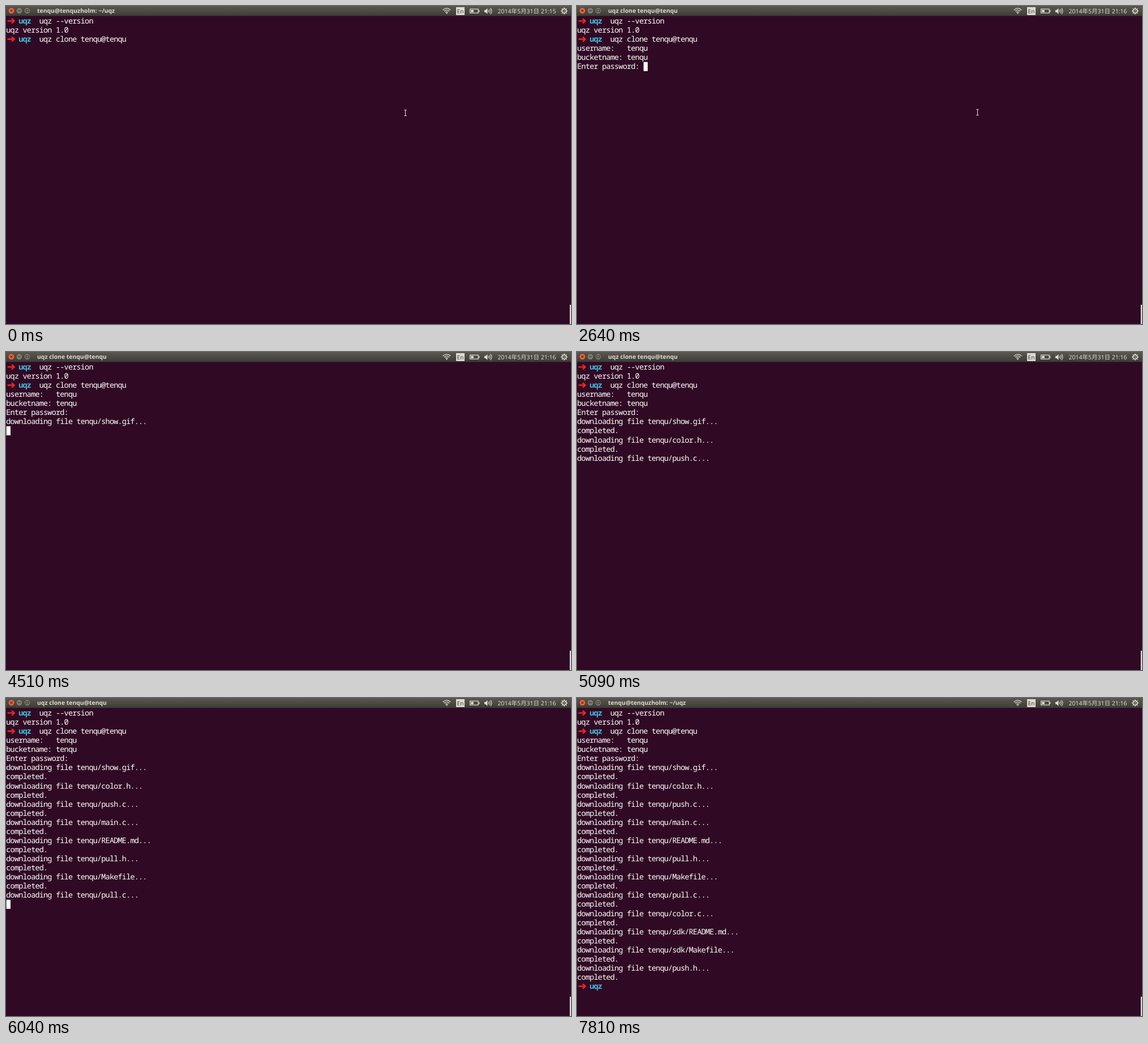
An HTML page with a canvas for the animation above (8000 ms loop, 998 by 561 pixels).

```html
<!DOCTYPE html>
<html lang="en">
<head>
<meta charset="utf-8">
<title>Terminal session</title>
<style>
  html, body { margin: 0; width: 100%; height: 100%; overflow: hidden; background: #300a24; }
  canvas { display: block; }
</style>
</head>
<body>
<canvas id="stage" width="998" height="561"></canvas>
<script>
const ctx = document.getElementById('stage').getContext('2d');
const LOOP = 8000;
const CELL = 7.305, ROW = 16.07, LEFT = 0.7, TOP = 18.4;
const MONO = '13.5px "Noto Sans Mono", "DejaVu Sans Mono", monospace';
const SANS = '"Noto Sans", "Noto Sans CJK SC", "Open Sans", sans-serif';
const PALE = '#dfdbd2';

const TOOL = 'uqz', USER = 'tenqu', HOST = 'tenquzholm';
const COMMAND = `${TOOL} clone ${USER}@${USER}`;

// Time at which each download line is printed.
const downloads = [
  [3830, 'show.gif'], [4740, 'color.h'], [4900, 'push.c'], [5400, 'main.c'],
  [5560, 'README.md'], [5720, 'pull.h'], [5870, 'Makefile'], [6040, 'pull.c'],
  [6360, 'color.c'], [6690, 'sdk/README.md'], [7260, 'sdk/Makefile'], [7610, 'push.h']
];
const DONE = 7750, PROMPT_BACK = 7810;
const blinkOn = [[3830, 3920], [4510, 5090], [5670, 6250], [6840, 7440]];

const within = (t, from, to) => t >= from && t < to;
const rowTop = row => TOP + row * ROW;

// Text sits on the terminal's cell grid, each glyph centred in its cell.
function print(text, row, col = 0, color = '#fff', weight = 500) {
  ctx.font = `${weight} ${MONO}`;
  ctx.letterSpacing = '0px';
  const spacing = CELL - ctx.measureText('m').width;
  ctx.letterSpacing = `${spacing}px`;
  ctx.fillStyle = color;
  ctx.fillText(text, LEFT + col * CELL + spacing / 2, rowTop(row) + 12.6);
  ctx.letterSpacing = '0px';
}

function label(text, x, y, font, color = PALE) {
  ctx.font = `${font} ${SANS}`;
  ctx.fillStyle = color;
  ctx.fillText(text, x, y);
}

function line(points, color, width) {
  ctx.strokeStyle = color;
  ctx.lineWidth = width;
  ctx.beginPath();
  points.forEach(([x, y]) => ctx.lineTo(x, y));
  ctx.stroke();
}

function arc(x, y, r, from, to, width = 1.2) {
  ctx.strokeStyle = PALE;
  ctx.lineWidth = width;
  ctx.beginPath();
  ctx.arc(x, y, r, from, to);
  ctx.stroke();
}

function disc(x, y, r, color) {
  ctx.fillStyle = color;
  ctx.beginPath();
  ctx.arc(x, y, r, 0, Math.PI * 2);
  ctx.fill();
}

function prompt(row, command = '') {
  const y = rowTop(row) + 8;
  ctx.lineCap = ctx.lineJoin = 'round';
  line([[3.6, y], [14, y]], '#ef2929', 2.4);
  line([[10.8, y - 3.5], [14.6, y], [10.8, y + 3.5]], '#ef2929', 2.4);
  ctx.lineCap = 'butt';
  ctx.lineJoin = 'miter';
  print(TOOL, row, 3, '#43bddb', 'bold');
  print(command, row, 8);
}

function block(row, col = 0) {
  ctx.fillStyle = '#fff';
  ctx.fillRect(LEFT + col * CELL, rowTop(row), CELL, ROW);
}

function pointer(x, y) {
  line([[x, y - 5], [x, y + 5]], '#e4dfe2', 1);
  for (const end of [-5, 5]) line([[x - 2.2, y + end], [x + 2.2, y + end]], '#e4dfe2', 1);
}

function windowButtons() {
  for (const [x, color] of [[9.5, '#e9633c'], [23.5, '#7f7a6f'], [37.5, '#7f7a6f']]) {
    disc(x, 8.3, 5.9, '#35332e');
    disc(x, 8.3, 5.2, color);
  }
  line([[7.7, 6.5], [11.3, 10.1]], '#6b2412', 1.1);
  line([[11.3, 6.5], [7.7, 10.1]], '#6b2412', 1.1);
  line([[21, 8.3], [26, 8.3]], '#403e38', 1.2);
  ctx.strokeRect(35, 6.5, 5, 3.6);
}

function indicators() {
  const up = -Math.PI / 2;
  for (const r of [3, 6, 9]) arc(778.5, 13.2, r, up - 0.85, up + 0.85, 1.3);
  disc(778.5, 12.6, 1.2, PALE);

  ctx.fillStyle = PALE;
  ctx.fillRect(795, 2, 15, 14);
  label('En', 796.6, 12.6, '500 10px', '#3c3b37');

  ctx.strokeStyle = PALE;
  ctx.lineWidth = 1.2;
  ctx.strokeRect(819.6, 5.4, 14.5, 7);
  ctx.fillStyle = PALE;
  ctx.fillRect(834.7, 7.1, 1.6, 3.6);
  ctx.fillRect(821.1, 6.9, 4.8, 4);

  ctx.beginPath();
  [[845, 7], [847.2, 7], [850.5, 4], [850.5, 14], [847.2, 11], [845, 11]]
    .forEach(([x, y]) => ctx.lineTo(x, y));
  ctx.fill();
  for (const r of [3, 5.5, 8]) arc(850, 9, r, -0.75, 0.75, 1.1);

  arc(986, 8.8, 3.5, 0, Math.PI * 2, 1.5);
  for (let i = 0; i < 8; i++) {
    const c = Math.cos(i * Math.PI / 4), s = Math.sin(i * Math.PI / 4);
    line([[986 + c * 3.8, 8.8 + s * 3.8], [986 + c * 6, 8.8 + s * 6]], PALE, 1.7);
  }
  disc(986, 8.8, 1, PALE);
}

function panel(t) {
  const shade = ctx.createLinearGradient(0, 0, 0, 18);
  shade.addColorStop(0, '#5a584f');
  shade.addColorStop(1, '#3c3b37');
  ctx.fillStyle = shade;
  ctx.fillRect(0, 0, 998, 17.5);
  windowButtons();
  const running = within(t, 1160, PROMPT_BACK);
  label(running ? COMMAND : `${USER}@${HOST}: ~/${TOOL}`, 55, 12.2, '600 10.4px');
  indicators();
  label(`2014年5月31日 21:${t < 770 ? 15 : 16}`, 868.5, 12.8, '10.5px');
}

function terminal(t) {
  prompt(0, `${TOOL} --version`);
  print(`${TOOL} version 1.0`, 1);
  prompt(2, COMMAND);
  if (t >= 1200) {
    print(`username:   ${USER}`, 3);
    print(`bucketname: ${USER}`, 4);
    print('Enter password:', 5);
  }
  downloads.forEach(([start, file], i) => {
    const end = i + 1 < downloads.length ? downloads[i + 1][0] : DONE;
    if (t >= start) print(`downloading file ${USER}/${file}...`, 6 + 2 * i);
    if (t >= end) print('completed.', 7 + 2 * i);
  });
  if (t >= PROMPT_BACK) prompt(30);
}

function textCursor(t) {
  if (within(t, 400, 990)) block(2, 29);
  else if (within(t, 1160, 1200)) block(3);
  else if (within(t, 1200, 3360)) block(5, 16);
  else if (within(t, 3360, 3830)) block(6);
  else if (blinkOn.some(([from, to]) => within(t, from, to))) {
    block(5 + 2 * downloads.filter(([start]) => t >= start).length);
  }
}

function mouse(t) {
  if (t < 1160) pointer(705.5, 188.5);
  else if (within(t, 2640, 2760)) {
    const step = Math.floor((t - 2640) / 40);
    pointer(707.5 + step * 1.5, 187.5 - step * 2);
  }
}

function draw(t) {
  ctx.fillStyle = '#300a24';
  ctx.fillRect(0, 0, 998, 561);
  panel(t);
  terminal(t);
  textCursor(t);
  mouse(t);
  ctx.fillStyle = '#dfdbd8';
  ctx.fillRect(995.8, 527, 2.2, 34);
}

ctx.textRendering = 'geometricPrecision';
const begin = performance.now();
function tick() {
  draw((performance.now() - begin) % LOOP);
  requestAnimationFrame(tick);
}
tick();
</script>
</body>
</html>
```
